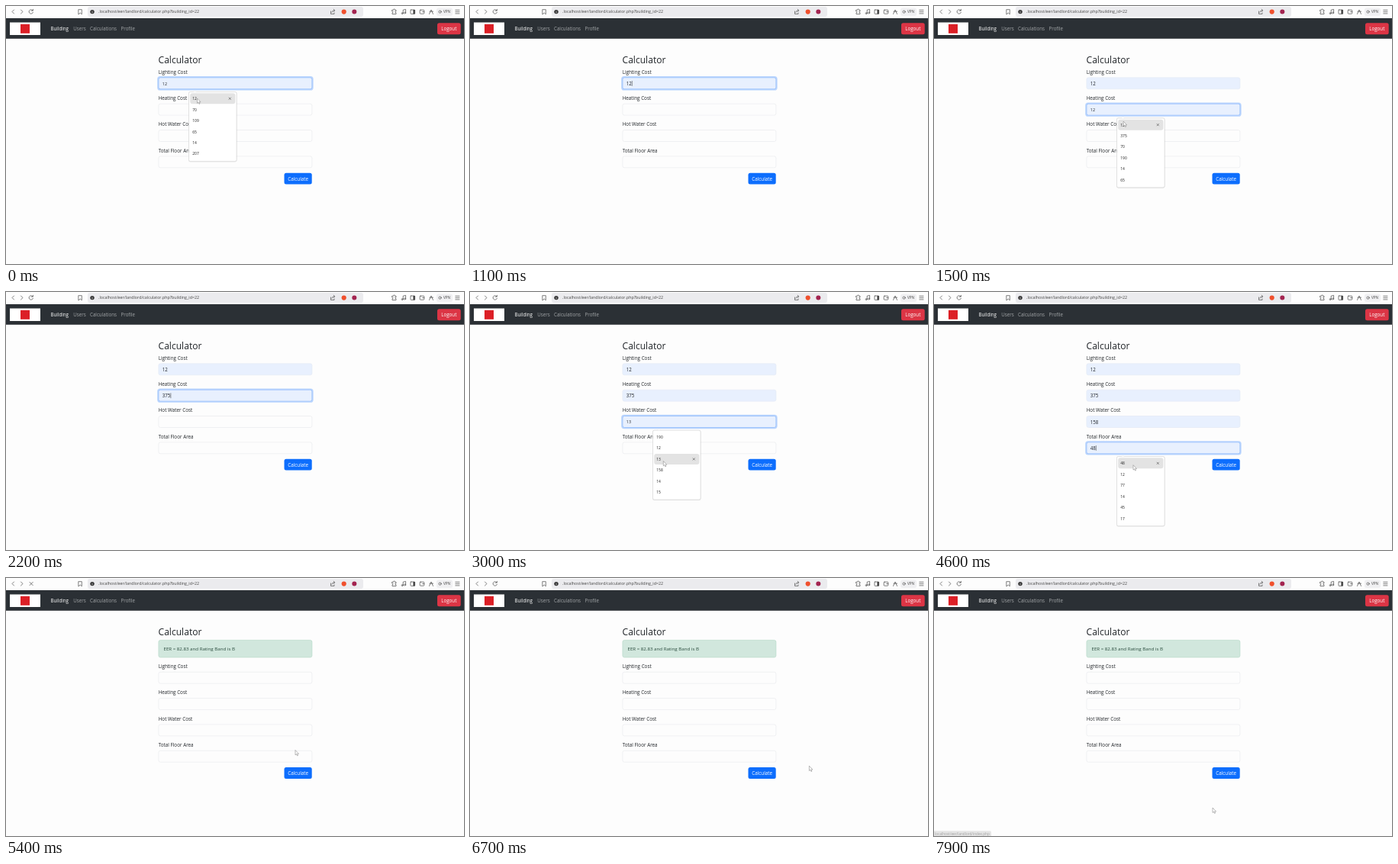
Recreate the animation shown at these times as an HTML page. Size 600 px wide and 338 px high, loop 8000 ms.

```html
<!DOCTYPE html>
<html lang="en">
<head>
<meta charset="utf-8">
<title>Calculator</title>
<style>
  html, body { margin: 0; width: 100%; height: 100%; overflow: hidden; background: #fdfdfd; }
  svg { display: block; width: 100vw; height: 100vh; }
  text { font-family: "Open Sans", "Noto Sans", sans-serif; white-space: pre; }
  .line { fill: none; stroke: #555; stroke-width: .75; stroke-linecap: round; stroke-linejoin: round; }
</style>
</head>
<body>
<svg viewBox="0 0 600 338" preserveAspectRatio="none">
  <rect width="600" height="338" fill="#fdfdfd"/>
  <rect x="107" y="1" width="361" height="13" rx="3" fill="#ebebee"/>
  <g class="line">
    <path d="M10.5 5 8 7.5 10.5 10M19.5 5 22 7.5 19.5 10"/>
    <path d="M95.2 4.7H99.3V10.8L97.25 9 95.2 10.8Z"/>
    <path d="M425.5 7V10.4H430V9M426.8 8.2Q427 5.8 430.5 5.8M429.2 4.3 430.8 5.8 429.2 7.3"/>
    <path d="M506 5.3H507.5Q507.5 4 508.5 4T509.5 5.3H511V7Q509.7 7 509.7 7.9T511 8.8V10.6H506V8.8Q507.2 8.7 507.2 7.9T506 7Z"/>
    <path d="M520.2 9.4V5.2L523.6 4.4V8.8"/>
    <circle cx="519.2" cy="9.6" r="1"/><circle cx="522.6" cy="9" r="1"/>
    <rect x="530" y="5" width="5.6" height="5.4" rx=".7"/>
    <rect x="542.2" y="5.2" width="5.6" height="5" rx=".8"/><path d="M545.7 7.5H547.8"/>
    <path d="M554.5 10.5 557 5 559.5 10.5M555 7.2H559.5"/>
    <path d="M588.8 5.3H594M588.8 7.6H594M588.8 9.9H594"/>
  </g>
  <rect x="533.4" y="5" width="2.4" height="5.4" fill="#444"/>
  <circle cx="113" cy="7.6" r="2.7" fill="#333"/>
  <path d="M113 7.2V9.2M113 5.8V6.3" stroke="#fff" stroke-width=".7"/>
  <circle cx="442.7" cy="7.6" r="3.1" fill="#f0502d"/>
  <circle cx="456.3" cy="7.6" r="3" fill="#a32450"/>
  <rect x="564" y="2.5" width="21" height="10.5" rx="2.5" fill="#f0f0f2"/>
  <circle cx="568.6" cy="7.6" r="1.6" class="line"/>
  <text x="573" y="9.4" font-size="4.7" fill="#444">VPN</text>
  <text x="121" y="9.4" font-size="5.32" fill="#444">.localhost/eer/landlord/calculator.php?building_id=22</text>

  <rect y="16" width="600" height="26.8" fill="#2b3035"/>
  <rect x="5" y="21.5" width="40" height="16.5" fill="#fff"/>
  <rect x="19" y="23.8" width="12" height="12" fill="#dc1f26"/>
  <g font-size="6.2" fill="#a3a6a8">
    <text x="58.5" y="32.3" fill="#fff" font-weight="500">Building</text>
    <text x="88.3" y="32.3">Users</text>
    <text x="110" y="32.3">Calculations</text>
    <text x="150.5" y="32.3">Profile</text>
  </g>
  <rect x="565" y="22.2" width="30.7" height="15" rx="2.5" fill="#dc3545"/>
  <text x="580.3" y="32.2" font-size="6.2" fill="#fff" text-anchor="middle">Logout</text>
  <text x="199.5" y="75" font-size="12.1" font-weight="500" fill="#212529">Calculator</text>
  <g id="live"></g>
</svg>
<script>
const LOOP = 8000, PITCH = 34.35, STEP = 14.45;
const LOADING = 5200, DONE = 5350, LOADED = 5700, SHIFT = 29.4;
const live = document.getElementById('live');

// focus span, menu opening, pick time and suggestions of each input
const fields = [
  { label: 'Lighting Cost', on: -500, off: 1200, open: -500, pick: 900, close: 900,
    value: 12, items: [12, 70, 109, 65, 14, 207] },
  { label: 'Heating Cost', on: 1200, off: 2250, open: 1280, pick: 2100, close: 2100,
    value: 375, items: [12, 375, 70, 190, 14, 65] },
  { label: 'Hot Water Cost', on: 2250, off: 4050, open: 2280, pick: 3880, close: 3880,
    value: 158, items: [190, 12, 13, 158, 14, 15] },
  { label: 'Total Floor Area', on: 4050, off: 9000, open: 4180, pick: 4560, close: 4650,
    value: 48, items: [48, 12, 77, 14, 45, 17] }
];

// pointer path: time, x, y
const path = [
  [0, 250.5, 121], [120, 250.5, 121], [330, 251, 132], [480, 251, 132], [700, 251, 122],
  [1450, 248, 150], [1800, 250, 168], [2100, 251, 170],
  [2420, 248, 188], [2600, 249, 200], [2900, 253, 219], [3000, 253.3, 221.5], [3200, 253.5, 222.5],
  [3300, 254, 232], [3500, 255, 262], [3700, 255, 234], [3950, 255, 234],
  [4300, 258, 219], [4450, 261, 226.5], [4780, 261, 227],
  [5100, 379, 225.5], [5650, 379, 225.5], [6300, 451, 250], [6650, 451, 250],
  [7300, 72, 30], [7450, 72, 36], [7900, 365, 301], [8000, 365, 301]
];
const hidden = [[950, 1450], [2150, 2420], [3950, 4300]];

const clamp = v => Math.min(1, Math.max(0, v));
const ease = (t, start, length) => {
  const p = clamp((t - start) / length);
  return p * p * (3 - 2 * p);
};
const rect = (x, y, w, h, r, more) =>
  `<rect x="${x}" y="${y}" width="${w}" height="${h}" rx="${r}" ${more}/>`;
const text = (x, y, size, str, fill = '#212529', more = '') =>
  `<text x="${x}" y="${y}" font-size="${size}" fill="${fill}" ${more}>${str}</text>`;

function pointer(t) {
  const i = Math.max(1, path.findIndex(k => k[0] > t));
  const [t0, x0, y0] = path[i - 1], [t1, x1, y1] = path[i];
  const p = ease(t, t0, t1 - t0);
  return {
    x: x0 + (x1 - x0) * p,
    y: y0 + (y1 - y0) * p,
    shown: !hidden.some(([a, b]) => t >= a && t < b)
  };
}

function hoverRow(f, mid, t, p) {
  if (t < f.open || t >= f.pick || !p.shown) return -1;
  const row = Math.floor((p.y - mid - 12.8) / STEP);
  return p.x > 240 && p.x < 302 && row >= 0 && row < f.items.length ? row : -1;
}

function input(f, i, t, p) {
  const done = t >= DONE;
  const mid = 101.3 + i * PITCH + (done ? SHIFT : 0);
  const row = done ? -1 : hoverRow(f, mid, t, p);
  const picked = !done && t >= f.pick;
  const filled = picked || row >= 0;
  const ring = done ? 0 : ease(t, f.on, 150) - ease(t, f.off, 150);
  let s = text(199.7, mid - 12.6, 6.3, f.label);
  if (ring > 0) s += rect(198.2, mid - 9.2, 204.4, 18.4, 3.6, `fill="#0d6efd" opacity="${.28 * ring}"`);
  s += rect(199.9, mid - 7.5, 201, 15, 2.4,
    `fill="${filled ? '#e8f0fe' : '#fdfdfd'}" stroke="${filled ? '#e1e8f3' : '#e6e8eb'}" stroke-width=".6"`);
  if (ring > 0) s += rect(199.9, mid - 7.5, 201, 15, 2.4,
    `fill="none" stroke="#86b7fe" stroke-width=".7" opacity="${ring}"`);
  if (picked) {
    s += text(204.8, mid + 2.5, 6.2, f.value);
    if (t < f.off) {
      const x = 205.2 + String(f.value).length * 3.55;
      s += `<path d="M${x} ${mid - 3.3}v6.8" stroke="#222" stroke-width=".5"/>`;
    }
  } else if (row >= 0) {
    s += text(204.8, mid + 2.3, 5.4, f.items[row]);
  }
  return s;
}

function menu(f, i, t, p) {
  if (t < f.open || t > f.close + 100) return '';
  const mid = 101.3 + i * PITCH, top = mid + 10.9;
  const row = t >= f.pick ? f.items.indexOf(f.value) : hoverRow(f, mid, t, p);
  let s = rect(239, top, 63.6, 92.2, 2.4, 'fill="#000" opacity=".09"')
    + rect(239.5, top + .3, 62.5, 90.9, 2, 'fill="#fff" stroke="#cfcfcf" stroke-width=".5"')
    + `<path d="M245.3 ${top + .6}l2.2 -2.2 2.2 2.2z" fill="#fff" stroke="#ddd" stroke-width=".3"/>`;
  f.items.forEach((item, n) => {
    const y = mid + 20 + n * STEP;
    if (n === row) {
      s += rect(241.2, y - 7, 59.2, 14, 3, 'fill="#e3e3e3"')
        + `<path d="M291.8 ${y - 1.5}l3 3m0 -3l-3 3" stroke="#444" stroke-width=".6"/>`;
    }
    s += text(244.3, y + 1.9, 4.95, item, '#222', 'font-weight="500"');
  });
  return `<g opacity="${1 - clamp((t - f.close) / 100)}">${s}</g>`;
}

function draw(t) {
  const p = pointer(t), done = t >= DONE;
  let s = t >= LOADING && t < LOADED
    ? '<path class="line" d="M31 5.4l4.2 4.2m0 -4.2l-4.2 4.2"/>'
    : '<path class="line" d="M35.4 8.3A2.7 2.7 0 1 1 34.8 5.6M35.4 4.3V6.2H33.5"/>';

  if (done) {
    s += rect(199.9, 81.4, 201, 22.6, 2.4, 'fill="#d1e7dd" stroke="#b3d7c5" stroke-width=".6"')
      + text(206.5, 95.2, 6.15, 'EER = 82.83 and Rating Band is B', '#26483a');
  }
  fields.forEach((f, i) => { s += input(f, i, t, p); });

  const y = 218.7 + (done ? SHIFT : 0);
  const over = p.shown && p.x > 364 && p.x < 401 && p.y > y && p.y < y + 15;
  s += rect(364.5, y, 36.2, 14.9, 2.5, `fill="${over ? '#0b5ed7' : '#0d6efd'}"`)
    + text(382.6, y + 9.9, 6.3, 'Calculate', '#fff', 'text-anchor="middle"');
  fields.forEach((f, i) => { s += menu(f, i, t, p); });

  const bar = ease(t, 7450, 80) * (1 - .8 * clamp((t - 7800) / 200));
  if (bar > 0) {
    s += `<g opacity="${bar}">` + rect(-3, 331.3, 78, 10, 2, 'fill="#d6d6d6"')
      + text(1.2, 336.8, 4.67, 'localhost/eer/landlord/index.php', '#666') + '</g>';
  }
  if (p.shown) {
    s += `<path transform="translate(${p.x} ${p.y})" d="M0 0V6.4L1.5 5.1 2.5 7.4 3.5 7 2.6 4.8H4.5Z"
      fill="#fff" stroke="#777" stroke-width=".5" stroke-linejoin="round"/>`;
  }
  live.innerHTML = s;
}

function frame() {
  draw(performance.now() % LOOP);
  requestAnimationFrame(frame);
}
frame();
</script>
</body>
</html>
```
